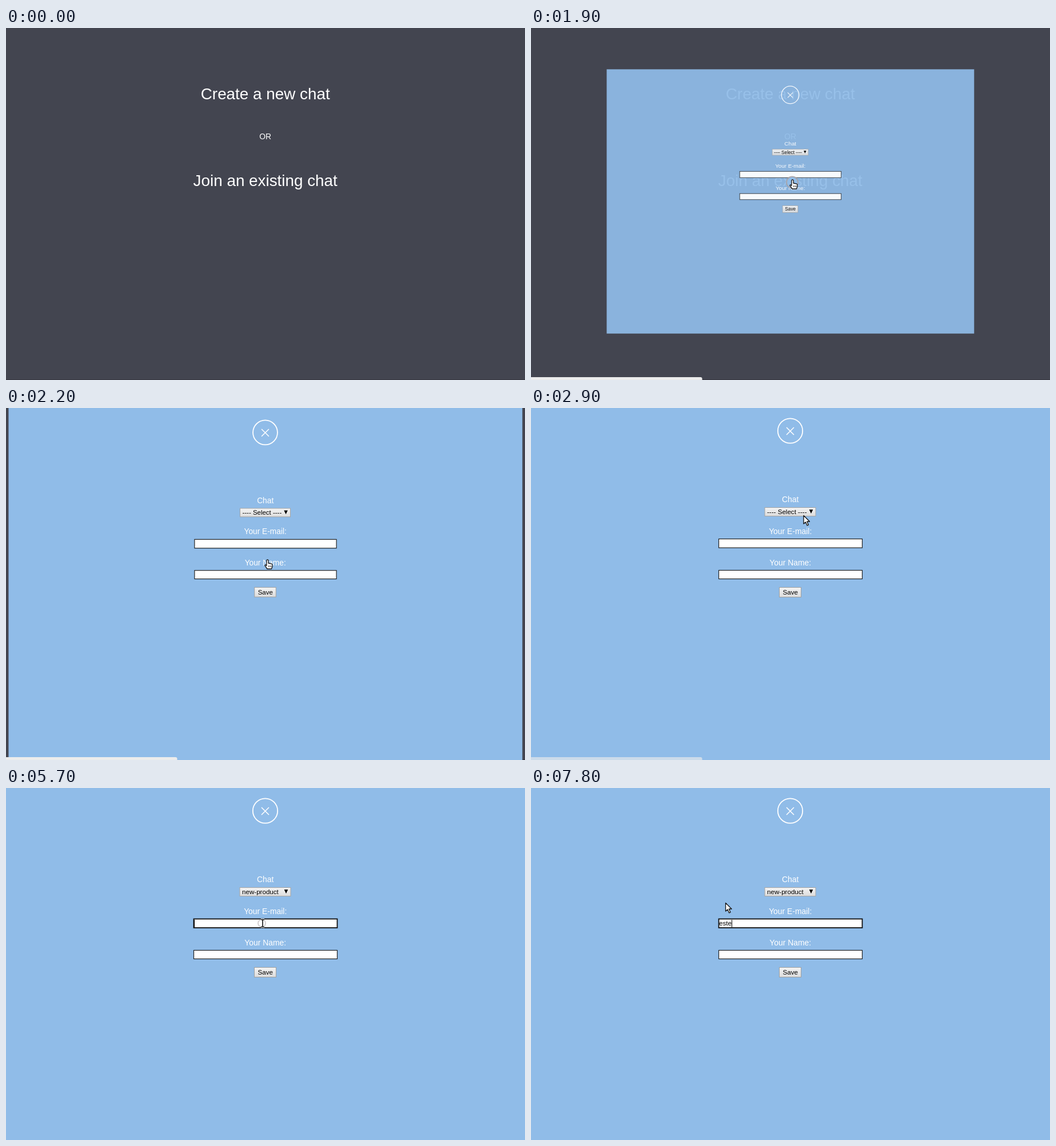
Write an HTML page with a canvas that moves like this. It is 908 px wide and 617 px high and loops after 8000 ms.

```html
<!DOCTYPE html>
<html lang="en">
<head>
<meta charset="utf-8">
<title>Join a chat</title>
<style>
  html, body { margin: 0; width: 100%; height: 100%; overflow: hidden; background: #434550; }
  canvas { display: block; }
</style>
</head>
<body>
<canvas id="stage" width="908" height="617"></canvas>
<script>
const c = document.getElementById('stage').getContext('2d');
const LOOP = 8000, MID = 453.7, MODAL_Y = 304;
const BLUE = '#90bce8', DARK = '#434550';

const ZOOM_START = 1699, ZOOM_TIME = 600;
const OPEN = 3500, HOVER = 4000, PICK = 4750, FOCUS = 5550;
const KEYS = [[6850, 'e'], [7100, 's'], [7500, 't'], [7750, 'e']];

// Click rings: time, x, y, radius, strength
const CLICKS = [[1650, 457, 270.5, 10, 1], [5500, 447.5, 237, 6.5, .6]];

// Pointer stops: time, x, y
const STOPS = [
  [450, 435, 404], [850, 448, 345], [1280, 457.5, 266.5], [2550, 457.5, 266.5],
  [2900, 477, 188.5], [3100, 475, 182], [3500, 475, 182], [4150, 472, 210],
  [5050, 472, 210], [5500, 449, 237], [6150, 449, 237], [6700, 340.5, 201.5]
];

const ARROW = new Path2D('M0,0V14.5l3.4,-3 2.6,5.8 2.4,-1 -2.6,-5.8H10.5z');
const HAND = new Path2D('M-1.6,.5q1.6,-2.4 3.2,0V5.5l5.4,1.2q1.5,.5 1.5,2V11.5l-1.5,4H-.5l-3.8,-5.3q-.6,-1.8 1,-1.8l1.7,1.6z');
const KNUCKLES = new Path2D('M2,9.5v3M4.3,9.5v3M6.4,9.5v3');
const BEAM = new Path2D('M-3,-6.5Q0,-6.5 0,-5V5Q0,6.5 -3,6.5M3,-6.5Q0,-6.5 0,-5M0,5Q0,6.5 3,6.5');

const clamp = v => Math.max(0, Math.min(1, v));
const smooth = v => v * v * (3 - 2 * v);

// The CSS "ease" curve: cubic-bezier(.25, .1, .25, 1)
function ease(x) {
  const curve = (u, a, b) => 3 * u * (1 - u) ** 2 * a + 3 * u * u * (1 - u) * b + u ** 3;
  let lo = 0, hi = 1;
  for (let i = 0; i < 20; i++) {
    const u = (lo + hi) / 2;
    if (curve(u, .25, .25) < x) lo = u; else hi = u;
  }
  return curve(lo, .1, 1);
}

function text(str, x, y, size, color = '#fff', align = 'center') {
  c.font = `${size}px "Liberation Sans", Arial, sans-serif`;
  c.textAlign = align;
  c.fillStyle = color;
  c.fillText(str, x, y);
}

function box(x, y, w, h, fill, line, width = 1) {
  c.fillStyle = fill;
  c.fillRect(x, y, w, h);
  c.strokeStyle = line;
  c.lineWidth = width;
  c.strokeRect(x, y, w, h);
}

function button(x, y, w, h, line) {
  const g = c.createLinearGradient(0, y, 0, y + h);
  g.addColorStop(0, '#f4f4f4');
  g.addColorStop(1, '#dcdcdc');
  box(x, y, w, h, g, line);
}

function drawMenu() {
  text('Create a new chat', MID, 124.5, 27.84);
  text('OR', MID, 195, 13.9);
  text('Join an existing chat', MID, 277, 27.84);
}

function drawClose() {
  c.strokeStyle = '#fff';
  c.lineWidth = 1.8;
  c.beginPath();
  c.arc(453.5, 40, 21.7, 0, 7);
  c.stroke();
  c.lineWidth = 1.5;
  c.beginPath();
  c.moveTo(447, 34); c.lineTo(460, 47);
  c.moveTo(460, 34); c.lineTo(447, 47);
  c.stroke();
}

function drawSelect(t) {
  const open = t >= OPEN && t < PICK;
  button(409, 174.5, 89, 15, open ? '#444' : '#a5a5a5');
  text(t < PICK ? '---- Select ----' : 'new-product', 413, 186, 11.6, '#000', 'left');
  c.beginPath();
  c.moveTo(486.7, 178); c.lineTo(493.3, 178); c.lineTo(490, 185);
  c.fill();
}

function drawOptions(t) {
  c.save();
  c.shadowColor = 'rgba(0,0,0,.35)';
  c.shadowBlur = 15;
  c.shadowOffsetY = 8;
  c.fillStyle = '#fff';
  c.fillRect(408.5, 190, 90, 31);
  c.restore();
  const row = t < HOVER ? 0 : 1;
  box(408.5, 190.5, 90, 30.5, '#fff', '#666');
  c.fillStyle = '#ee6c3c';
  c.fillRect(409, 190.5 + row * 15, 89, 15);
  ['---- Select ----', 'new-product'].forEach((s, i) =>
    text(s, 413, 201.5 + i * 14.7, 11.6, i === row ? '#fff' : '#000', 'left'));
}

function drawForm(t) {
  drawClose();
  text('Chat', MID, 165, 13.9);
  drawSelect(t);
  text('Your E-mail:', MID, 220.5, 13.9);
  box(328.5, 229.5, 251, 15.5, '#fff', t < FOCUS ? '#222' : '#111', t < FOCUS ? 1.2 : 1.8);
  text('Your Name:', MID, 276, 13.9);
  box(328.5, 284.5, 251, 15, '#fff', '#222', 1.2);
  button(434.5, 314.5, 38, 17, '#a0a0a0');
  text('Save', MID, 327, 11.6, '#000');

  if (t >= FOCUS) {
    const typed = KEYS.filter(k => t >= k[0]).map(k => k[1]).join('');
    text(typed, 329, 241, 11.6, '#000', 'left');
    c.fillRect(329 + c.measureText(typed).width, 231, 1, 13);
  }
  if (t >= OPEN && t < PICK) drawOptions(t);
}

function drawModal(t) {
  const p = clamp((t - ZOOM_START) / ZOOM_TIME);
  if (!p) return;
  const s = .3 + .7 * ease(p);
  c.save();
  c.globalAlpha = ease(clamp(p * 2));
  c.translate(MID, MODAL_Y);
  c.scale(s, s);
  c.translate(-MID, -MODAL_Y);
  c.fillStyle = BLUE;
  c.fillRect(-.6, -23.5, 909, 655);
  drawForm(t);
  c.restore();
}

function drawStatus(t) {
  const a = clamp((t - 1350) / 100) * clamp((3100 - t) / 300);
  if (!a) return;
  c.save();
  c.globalAlpha = a;
  c.beginPath();
  c.roundRect(-5, 612, 304.5, 12, 3);
  c.fillStyle = '#ececec';
  c.fill();
  text('loading the chat list, this will take a bit', 2, 625, 11.6, '#777', 'left');
  c.restore();
}

function drawClick(t) {
  for (const [start, x, y, r, strength] of CLICKS) {
    const p = (t - start) / 550;
    if (p < 0 || p > 1) continue;
    c.save();
    c.beginPath();
    c.arc(x, y, r, 0, 7);
    if (t < OPEN) {
      c.fillStyle = t < ZOOM_START + 200 ? DARK : BLUE;
      c.fill();
    }
    c.globalAlpha = strength * (1 - p * .4);
    c.strokeStyle = '#a9a0a2';
    c.lineWidth = 2;
    c.stroke();
    c.restore();
  }
}

function drawPointer(t) {
  if (t < STOPS[0][0]) return;
  let i = STOPS.findIndex(s => s[0] > t);
  if (i < 0) i = STOPS.length - 1;
  const [t0, x0, y0] = STOPS[i - 1], [t1, x1, y1] = STOPS[i];
  const k = smooth(clamp((t - t0) / (t1 - t0)));
  const x = x0 + (x1 - x0) * k, y = y0 + (y1 - y0) * k;

  c.save();
  c.translate(x, y);
  c.lineJoin = 'round';
  if (t > PICK && y > 229) {
    c.strokeStyle = '#fff';
    c.lineWidth = 3.5;
    c.stroke(BEAM);
    c.strokeStyle = '#222';
    c.lineWidth = 1.7;
    c.stroke(BEAM);
  } else {
    const shape = t < 2600 && y < 284 ? HAND : ARROW;
    c.fillStyle = '#fff';
    c.fill(shape);
    c.strokeStyle = '#111';
    c.lineWidth = 1.3;
    c.stroke(shape);
    if (shape === HAND) {
      c.lineWidth = .8;
      c.stroke(KNUCKLES);
    }
  }
  c.restore();
}

function draw(now) {
  const t = now % LOOP;
  c.fillStyle = DARK;
  c.fillRect(0, 0, 908, 617);
  c.fillStyle = '#36373f';
  c.fillRect(0, 616, 908, 1);
  drawMenu();
  drawModal(t);
  drawStatus(t);
  drawClick(t);
  drawPointer(t);
  requestAnimationFrame(draw);
}
requestAnimationFrame(draw);
</script>
</body>
</html>
```
